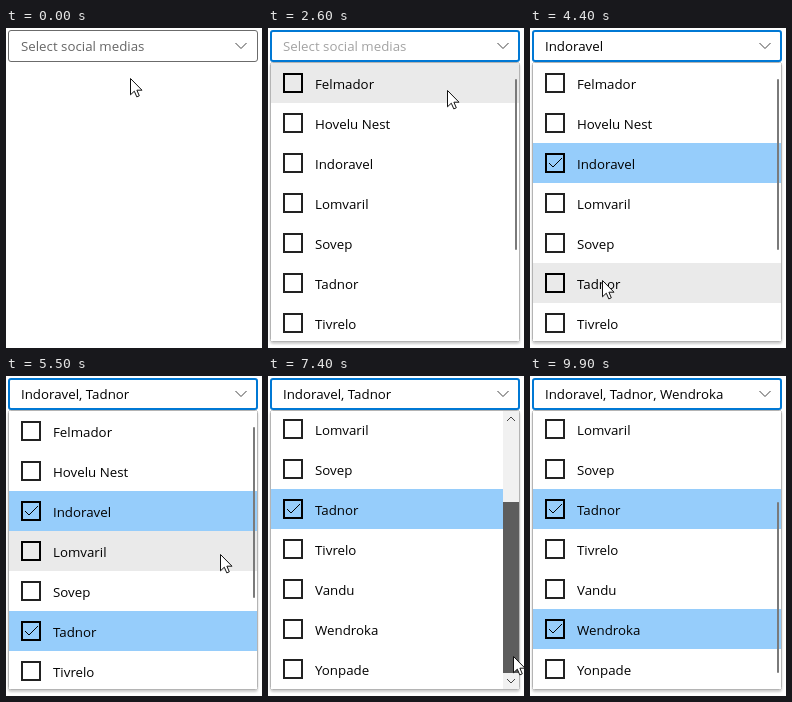
Animation, 256 px wide and 320 px high, one loop 10 s. Source, as an HTML page:

```html
<!DOCTYPE html>
<html lang="en">
<head>
<meta charset="utf-8">
<title>Multi-select combo box</title>
<style>
html, body { margin: 0; width: 100%; height: 100%; overflow: hidden; background: #fff; }
svg { display: block; width: 256px; height: 320px; }
text { font: 13.3px "Open Sans", "Noto Sans", sans-serif; fill: #000; white-space: pre; }
.label { transform-box: fill-box; transform-origin: center; }
.line { fill: none; stroke: #444; }
</style>
</head>
<body>
<svg viewBox="0 0 256 320">
  <defs>
    <clipPath id="view"><rect x="3" y="35" width="248" height="278"/></clipPath>
    <filter id="shade" x="-5%" y="-5%" width="110%" height="110%">
      <feDropShadow dx="0" dy="2" stdDeviation="1.3" flood-opacity=".2"/>
    </filter>
  </defs>
  <g id="popup">
    <rect x="2.5" y="34.5" width="249" height="279" rx="2" fill="#fff" stroke="#b4b4b4" filter="url(#shade)"/>
    <g clip-path="url(#view)">
      <g id="list"></g>
      <g id="track">
        <rect x="235" y="35" width="16" height="278" fill="#f1f1f1"/>
        <path class="line" d="M239 45l4-4 4 4M239 303l4 4 4-4"/>
      </g>
      <rect id="thumb" height="171"/>
    </g>
  </g>
  <rect id="box" fill="#fff"/>
  <text id="value" x="15" y="23"></text>
  <path class="line" d="M229.5 15l5.5 5.5 5.5-5.5"/>
  <path id="cursor" d="M.5 -.5V15.8L4.3 12.2 6.8 17.9 9.3 16.8 6.9 11.2H12Z" fill="#fff" stroke="#111"/>
</svg>
<script>
const LOOP = 10000, STEP = 100;
const TOP = 35, ROW = 40, VIEW = 278;
const NAMES = ["Felmador", "Hovelu Nest", "Indoravel", "Lomvaril", "Sovep",
  "Tadnor", "Tivrelo", "Vandu", "Wendroka", "Yonpade"];
const MAX_SCROLL = NAMES.length * ROW - VIEW;
const TRAVEL = 75;

// Row presses; the row becomes selected 200 ms later
const PICKS = [{ row: 2, at: 3300 }, { row: 5, at: 4700 }, { row: 8, at: 8400 }];
const HOLD = 200;

// time, x, y
const POINTER = [
  [700, 124, 51], [1300, 188, 22], [2400, 188, 22], [2600, 179, 63],
  [3100, 130, 130], [3600, 130, 130], [4400, 72, 253], [4900, 72, 253],
  [5500, 214, 179], [5900, 242, 174], [6800, 242, 174], [6900, 242, 213],
  [7400, 245, 281], [7600, 245, 281], [7700, 226, 269], [8100, 121, 255],
  [9100, 121, 255], [9200, 104, 314], [9300, 95, 345]
];
const EXPAND = [[5900, 0], [6300, 1], [9600, 1], [9900, 0]];

const $ = id => document.getElementById(id);
const mix = (a, b, k) => a + (b - a) * k;

function set(el, attrs) {
  for (const key in attrs) el.setAttribute(key, attrs[key]);
  return el;
}

function add(parent, tag, attrs) {
  const el = document.createElementNS("http://www.w3.org/2000/svg", tag);
  parent.append(set(el, attrs));
  return el;
}

// Values of a keyframe track at time t
function sample(keys, t) {
  const i = keys.findIndex(k => k[0] > t);
  if (i === 0) return keys[0].slice(1);
  if (i < 0) return keys[keys.length - 1].slice(1);
  const a = keys[i - 1], b = keys[i];
  const k = (t - a[0]) / (b[0] - a[0]);
  return a.slice(1).map((v, n) => mix(v, b[n + 1], k));
}

const rows = NAMES.map(name => {
  const g = add($("list"), "g", {});
  const back = add(g, "rect", { x: 3, width: 248, height: ROW });
  const check = add(g, "rect", { x: 16, y: 11, width: 18, height: 18, fill: "none", "stroke-width": 2 });
  const tick = add(g, "path", { d: "M19 20l4 4 9-9", fill: "none", stroke: "#000" });
  const label = add(g, "text", { x: 47, y: 26, class: "label" });
  label.textContent = name;
  return { g, back, check, tick, label };
});

function drawBox(t, y) {
  const focus = t >= 1600;
  set($("box"), focus
    ? { x: 3, y: 3, width: 248, height: 30, rx: 2, stroke: "#0078d4", "stroke-width": 2 }
    : { x: 2.5, y: 2.5, width: 249, height: 31, rx: 2.5, stroke: y < 34 ? "#333" : "#6b6b6b", "stroke-width": 1 });
  const chosen = PICKS.filter(p => t >= p.at + HOLD).map(p => NAMES[p.row]);
  $("value").textContent = chosen.join(", ") || "Select social medias";
  $("value").style.fill = chosen.length ? "#000" : focus ? "#a3a3a3" : "#666";
}

function drawRows(t, x, y, scroll) {
  const inside = x < 235 && y >= TOP && y < TOP + VIEW;
  const hover = inside ? Math.floor((y - TOP + scroll) / ROW) : -1;
  rows.forEach((row, i) => {
    const pick = PICKS.find(p => p.row === i);
    const age = pick ? t - pick.at : -1;
    const on = age >= HOLD;
    const fill = on ? "#96cdfb" : age >= 0 ? "#ccc" : i === hover ? "#eaeaea" : "#fff";
    set(row.g, { transform: `translate(0 ${TOP + i * ROW - scroll})` });
    set(row.back, { fill });
    set(row.check, { stroke: on || i === hover ? "#000" : "#222" });
    row.tick.style.display = on ? "" : "none";
    const ease = Math.min(1, Math.max(0, (age - 300) / 300));
    row.label.style.transform = age < 0 || ease === 1 ? "none" : `scale(${mix(.976, 1, ease)})`;
  });
}

function drawBar(t, shift) {
  const [wide] = sample(EXPAND, t);
  let tone = 122;
  if (t >= 6700 && t < 7700) tone = 93;
  if (t >= 7700) tone = Math.round(mix(122, 194, wide));
  set($("track"), { opacity: wide });
  set($("thumb"), {
    x: mix(247, 235, wide), y: 51 + shift, width: mix(2, 16, wide), rx: 1 - wide,
    fill: `rgb(${tone},${tone},${tone})`
  });
  $("thumb").style.display = t >= 2500 ? "" : "none";
}

function draw(time) {
  const t = Math.floor((time % LOOP) / STEP) * STEP;
  const [x, y] = sample(POINTER, t).map(Math.round);
  const shift = t < 6900 ? 0 : t < 7400 ? Math.min(TRAVEL, y - 174) : TRAVEL;
  const scroll = Math.round(shift * MAX_SCROLL / TRAVEL);
  drawBox(t, y);
  $("popup").style.display = t >= 1900 ? "" : "none";
  drawRows(t, x, y, scroll);
  drawBar(t, shift);
  set($("cursor"), { transform: `translate(${x} ${y})` });
}

const start = performance.now();
function tick() {
  draw(performance.now() - start);
  requestAnimationFrame(tick);
}
tick();
</script>
</body>
</html>
```
